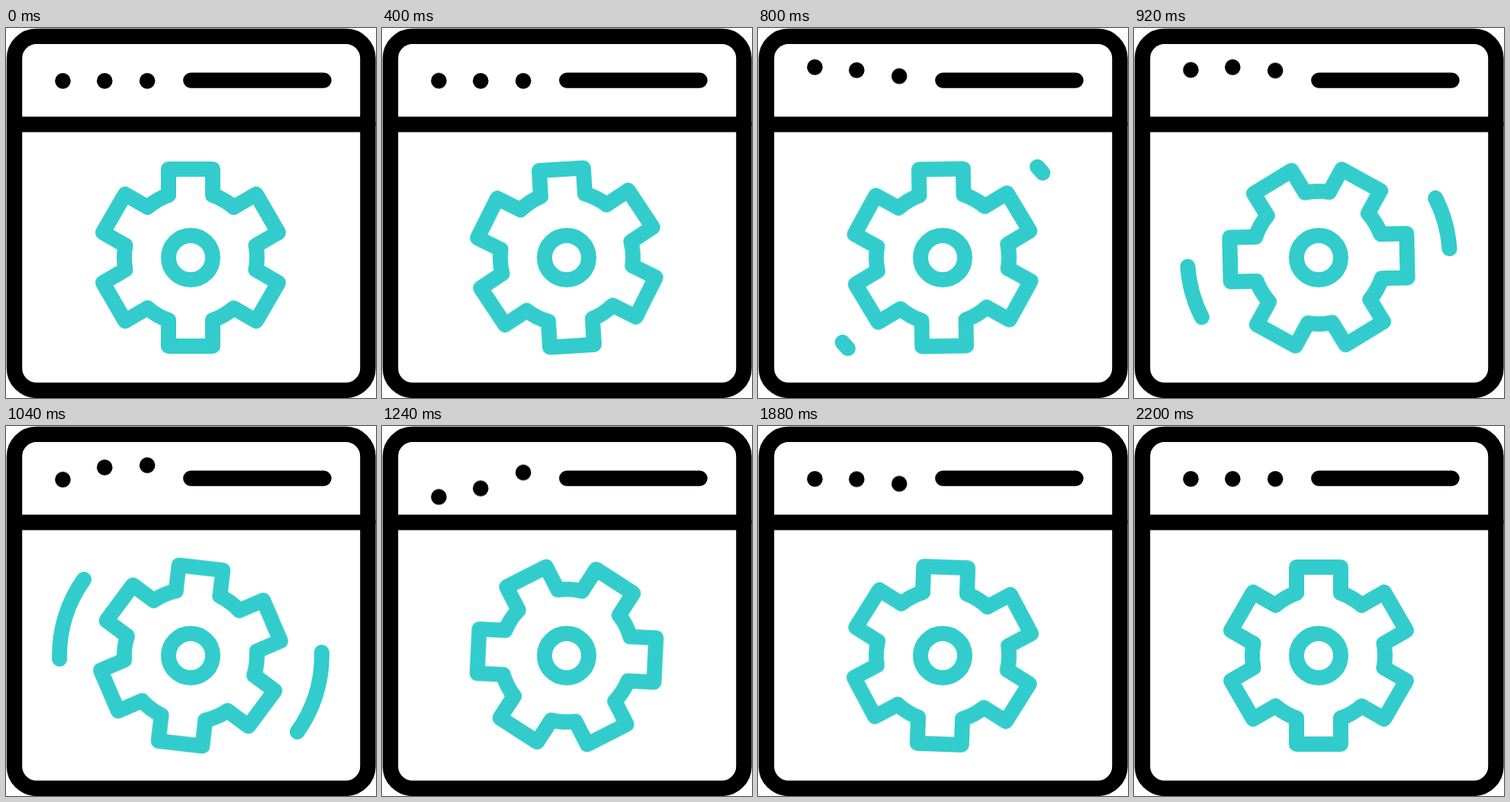
Write an HTML page without scripts that moves like this. It is 485 by 485 pixels and loops after 2400 ms.

```html
<!DOCTYPE html>
<html lang="en">
<head>
<meta charset="utf-8">
<title>Settings window</title>
<style>
  html, body { margin: 0; height: 100%; overflow: hidden; background: #fff; }
  svg { display: block; width: 100vw; height: 100vh; }

  .line { fill: none; stroke: #000; stroke-width: 20.4; stroke-linecap: round; }
  .teal { fill: none; stroke: #3cc; stroke-width: 20; stroke-linecap: round; stroke-linejoin: round; }

  .gear, .dot, .arcs, .arc { animation: 2400ms linear infinite; }

  /* wind back, one clockwise turn, small overshoot */
  .gear { animation-name: turn; }
  @keyframes turn {
    0%, 8.333% { transform: rotate(0deg); animation-timing-function: cubic-bezier(.333, .571, .667, 1.19); }
    16.667% { transform: rotate(-3.5deg); animation-timing-function: cubic-bezier(.333, .021, .667, .496); }
    33.333% { transform: rotate(58.7deg); animation-timing-function: cubic-bezier(.333, .278, .667, .562); }
    43.333% { transform: rotate(126.3deg); animation-timing-function: cubic-bezier(.333, .286, .667, .698); }
    51.667% { transform: rotate(212.5deg); animation-timing-function: cubic-bezier(.333, .448, .667, .759); }
    65% { transform: rotate(305.3deg); animation-timing-function: cubic-bezier(.333, .433, .667, .979); }
    80% { transform: rotate(363.5deg); animation-timing-function: cubic-bezier(.333, -.267, .667, .2); }
    91.667%, 100% { transform: rotate(360deg); }
  }

  /* up, down, back to rest; each dot lags the one before */
  .dot { animation-name: bob; animation-delay: calc(var(--n) * 130ms); }
  @keyframes bob {
    0%, 15.417% { transform: translateY(0); animation-timing-function: cubic-bezier(.333, 0, .667, 1); }
    33.333%, 33.75% { transform: translateY(-18px); animation-timing-function: cubic-bezier(.5, 0, .5, 1); }
    54.167%, 54.583% { transform: translateY(24.5px); animation-timing-function: cubic-bezier(.42, 0, .58, 1); }
    74.583%, 100% { transform: translateY(0); }
  }

  .arcs { animation-name: show; animation-timing-function: step-end; }
  @keyframes show {
    0% { visibility: hidden; }
    31.25% { visibility: visible; }
    50.5%, 100% { visibility: hidden; }
  }

  .arc { animation-name: sweep; }
  @keyframes sweep {
    0%, 30.833% { stroke-dasharray: .01 200; stroke-dashoffset: 0; }
    33.333% { stroke-dasharray: 3.4 200; stroke-dashoffset: -2.3; }
    36.667% { stroke-dasharray: 15.7 200; stroke-dashoffset: -11.8; }
    40% { stroke-dasharray: 30.2 200; stroke-dashoffset: -26.2; }
    43.333% { stroke-dasharray: 37.1 200; stroke-dashoffset: -44.5; }
    46.667% { stroke-dasharray: 27.7 200; stroke-dashoffset: -64.7; }
    50.417%, 100% { stroke-dasharray: .01 200; stroke-dashoffset: -92.3; }
  }
</style>
</head>
<body>
<svg viewBox="0 0 485 485">
  <defs>
    <path id="tooth" d="M-29-82V-116H29V-82A87 87 0 0 1 56.5-66.1"/>
  </defs>

  <rect class="line" x="11" y="10.9" width="463.4" height="464" rx="29"/>
  <path class="line" d="M11 126.4H474.4M242.3 68.6H416.5"/>

  <circle class="dot" style="--n:0" cx="74.5" cy="69.4" r="10.3"/>
  <circle class="dot" style="--n:1" cx="129.3" cy="69.4" r="10.3"/>
  <circle class="dot" style="--n:2" cx="185.2" cy="69.4" r="10.3"/>

  <g class="teal" transform="translate(242 301)">
    <circle r="29"/>
    <g class="gear">
      <use href="#tooth"/>
      <use href="#tooth" transform="rotate(60)"/>
      <use href="#tooth" transform="rotate(120)"/>
      <use href="#tooth" transform="rotate(180)"/>
      <use href="#tooth" transform="rotate(240)"/>
      <use href="#tooth" transform="rotate(300)"/>
    </g>
    <g class="arcs">
      <path class="arc" pathLength="92.4" d="M119-124.1A172 172 0 0 1 119 124.1"/>
      <path class="arc" pathLength="92.4" d="M-119 124.1A172 172 0 0 1-119-124.1"/>
    </g>
  </g>
</svg>
</body>
</html>
```
